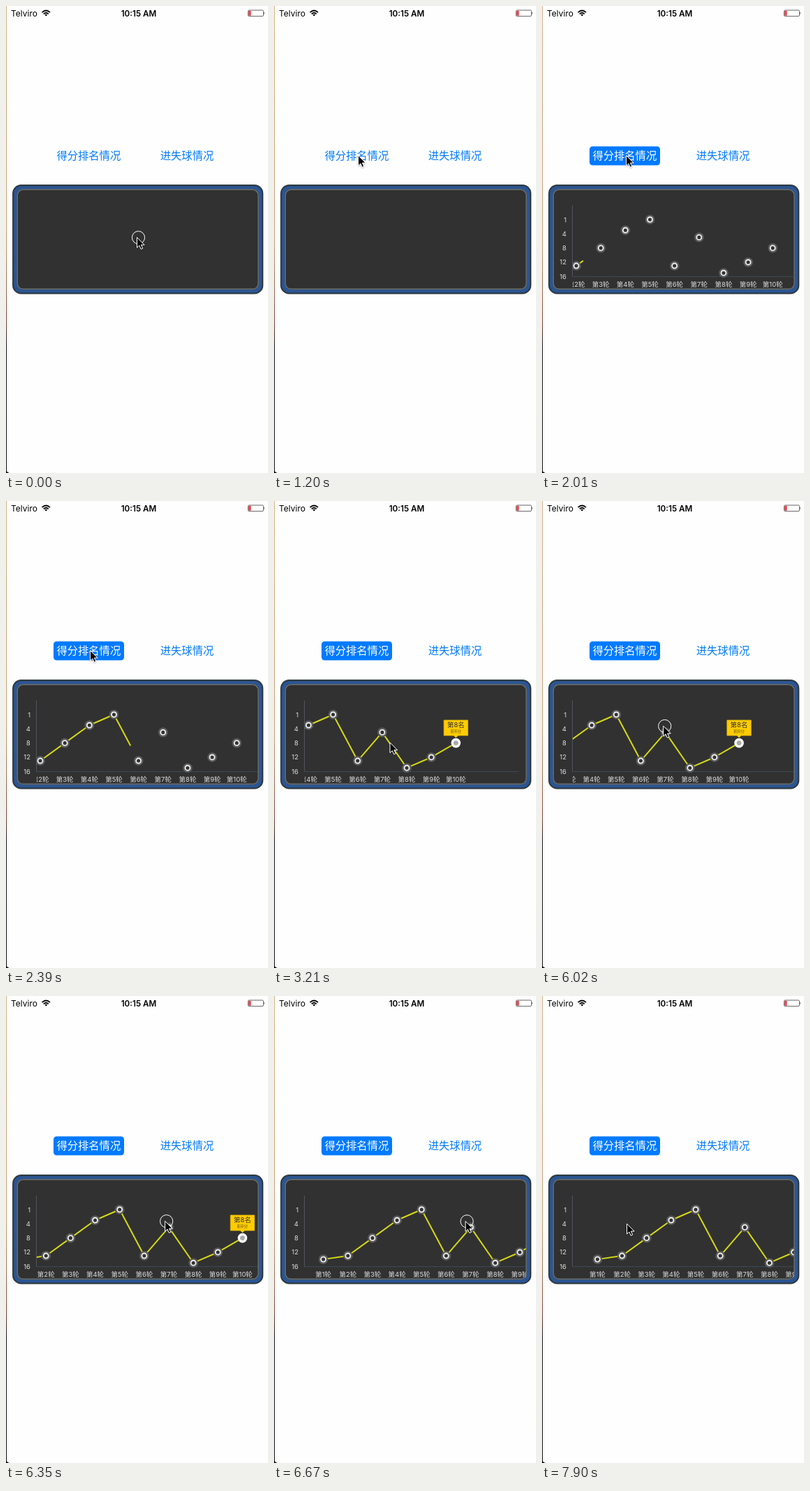
An HTML page for the animation above (8000 ms loop, 375x667 px).

```html
<!DOCTYPE html>
<html lang="zh">
<head>
<meta charset="utf-8">
<style>
html, body { margin: 0; width: 100%; height: 100%; overflow: hidden; background: #fefefe; }
svg { display: block; font-family: Inter, "Noto Sans CJK SC", "Noto Sans CJK", sans-serif; }
.btn { font-size: 15.3px; fill: #007aff; }
.axis { font-size: 9.5px; fill: #dcdcdc; }
.mid { text-anchor: middle; }
</style>
</head>
<body>
<svg width="375" height="667" viewBox="0 0 375 667">
  <defs>
    <linearGradient id="edge" x2="0" y2="1">
      <stop offset="0" stop-color="#d3b083"/>
      <stop offset=".5" stop-color="#c59a6a"/>
      <stop offset=".68" stop-color="#7d4030"/>
      <stop offset=".73" stop-color="#14121a"/>
      <stop offset="1" stop-color="#0c0c10"/>
    </linearGradient>
    <clipPath id="view"><rect x="44" y="282" width="316.5" height="121"/></clipPath>
    <filter id="shadow" x="-50%" y="-50%" width="200%" height="200%">
      <feDropShadow dx="0" dy="1" stdDeviation=".8" flood-opacity=".35"/>
    </filter>
  </defs>

  <rect width="1" height="667" fill="url(#edge)"/>
  <path d="M0 662Q1 666 5 667H0Z" fill="#111"/>

  <!-- status bar -->
  <text x="7" y="14.5" font-size="12">Telviro</text>
  <g fill="none" stroke="#000" stroke-width="1.8">
    <path d="M51.6 9.2Q57.3 3.8 63 9.2M53.8 11.4Q57.3 8.2 60.8 11.4"/>
    <path d="M55.3 12.6Q57.3 10.9 59.3 12.6L57.3 14.6Z" fill="#000" stroke="none"/>
  </g>
  <text class="mid" x="190" y="14.5" font-size="11.7" font-weight="600">10:15 AM</text>
  <rect x="346.5" y="6" width="22" height="8.6" rx="1.6" fill="none" stroke="#555" stroke-width=".9"/>
  <rect x="347.3" y="6.9" width="3.2" height="6.8" fill="#f5333f"/>
  <path d="M369.3 8.6Q371 10.3 369.3 12Z" fill="#333"/>

  <rect id="selected" x="68" y="200.5" width="101" height="27" rx="4.5" fill="#007aff"/>
  <text id="rankBtn" class="btn mid" x="118.3" y="219.3">得分排名情况</text>
  <text class="btn mid" x="259" y="219.3">进失球情况</text>

  <!-- panel -->
  <rect x="10.2" y="256.2" width="357" height="154.2" rx="11.5" fill="#2a5596" stroke="#2f3b42" stroke-width="2.2"/>
  <rect x="15.8" y="261.8" width="345.8" height="143" rx="8.4" fill="#313131" stroke="#3c5577" stroke-width="2"/>
  <rect x="16.4" y="262.4" width="344.6" height="141.8" rx="8" fill="none" stroke="#6f7064" stroke-width="1.2"/>

  <g id="chart">
    <path d="M43.5 285V386.5" stroke="#50555b"/>
    <g id="scale" class="axis" text-anchor="end"></g>
    <g clip-path="url(#view)">
      <g id="content">
        <path d="M-100 386.5H485.5" stroke="#3d4859"/>
        <path id="line" fill="none" stroke="#d5d911" stroke-width="2" stroke-linejoin="round" pathLength="100"/>
        <g id="dots"></g>
        <g id="tip" class="mid">
          <circle r="6.8" cy="345.6" fill="#fff"/>
          <circle r="3.4" cy="345.6" fill="#aaa"/>
          <path d="M-17.2 313H17.2V335H3L0 338L-3 335H-17.2Z" fill="#fc0" stroke="#e3b505" stroke-width=".8" stroke-linejoin="round"/>
          <text y="322.8" font-size="9.5" fill="#333">第8名</text>
          <text y="330.8" font-size="6" fill="#6b5a10">积6分</text>
        </g>
      </g>
    </g>
  </g>

  <g id="cursor">
    <circle id="touch" cx="2" cy=".2" r="9.1" fill="none" stroke="#fff"/>
    <path d="M0 0V14.6L3.4 11.6L5.7 16.8L8.2 15.7L5.9 10.7H10.6Z" fill="#050505" stroke="#fff" stroke-linejoin="round" filter="url(#shadow)"/>
  </g>
</svg>
<script>
const LOOP = 8000, STEP = 35.15, FIRST = 79.4;
const PRESS = 1700, OPEN = 1900, DRAWN = 2910, DRAG = 5890, DROP = 6920;
const SCROLL_START = 65.5, SCROLL_END = 135.4;
const ranks = [14, 13, 8, 3, 0, 13, 5, 15, 12, 8];

const $ = id => document.getElementById(id);
const px = i => FIRST + STEP * i;
const py = rank => 305 + 5.08 * rank;
const clamp = (v, lo, hi) => Math.min(hi, Math.max(lo, v));
const show = (id, on) => $(id).style.display = on ? '' : 'none';
const shift = (id, x, y) => $(id).setAttribute('transform', `translate(${x} ${y})`);

const linear = p => p;
const smooth = p => p * p * (3 - 2 * p);
const slow = p => 1 - (1 - p) ** 1.2;

// Each move takes the pointer on to x, y; sag bends it downwards
const home = { x: 187.5, y: 330.5 };
const moves = [
  { from: 510, to: 1200, x: 120.5, y: 213.4, ease: smooth },
  { from: 2430, to: 2680, x: 166, y: 345, ease: smooth },
  { from: 3210, to: 3610, x: 133.5, y: 319.5, ease: smooth },
  { from: DRAG, to: 6020, x: 173.5, y: 321.3, ease: linear },
  { from: 6020, to: DROP, x: 301.5, y: 321.8, ease: slow },
  { from: 7360, to: 7900, x: 121.5, y: 325.3, ease: linear, sag: 14 }
];

function pointerAt(t) {
  let { x, y } = home;
  for (const m of moves) {
    const p = m.ease(clamp((t - m.from) / (m.to - m.from), 0, 1));
    x += (m.x - x) * p;
    y += (m.y - y) * p + (m.sag || 0) * Math.sin(Math.PI * p);
  }
  return { x, y };
}

function scrollAt(t, x) {
  if (t < DRAWN) return SCROLL_START;
  if (t < DRAG) return SCROLL_END;
  return t > DROP ? 0 : clamp(113.9 - 1.045 * (x - 173.5), 0, SCROLL_END);
}

function draw(now) {
  const t = now % LOOP, { x, y } = pointerAt(t), open = t >= OPEN;
  shift('cursor', x, y);
  shift('content', -scrollAt(t, x), 0);
  show('touch', t < 30 || t >= 5330 && t < 7120);
  show('selected', open);
  show('chart', open);
  show('tip', t >= DRAWN);
  $('rankBtn').style.fill = open ? '#fff' : '';
  $('rankBtn').style.opacity = !open && t >= PRESS ? .2 : 1;
  const drawn = clamp((t - OPEN) / 10, 0, 100);
  $('line').setAttribute('stroke-dasharray', `${drawn} ${drawn < 100 ? 200 : 0}`);
  requestAnimationFrame(draw);
}

$('scale').innerHTML = [1, 4, 8, 12, 16]
  .map((n, i) => `<text x="35" y="${py(i * 4) + 3.5}">${n}</text>`).join('');
$('line').setAttribute('d', 'M' + ranks.map((r, i) => px(i) + ' ' + py(r)).join('L'));
$('dots').innerHTML = ranks.map((r, i) => `
  <g transform="translate(${px(i)} ${py(r)})">
    <circle r="6.8" fill="#5c5c5c"/>
    <circle r="3.5" fill="#333" stroke="#ececec" stroke-width="1.9"/>
  </g>
  <text class="axis mid" x="${px(i)}" y="400.6">第${i + 1}轮</text>`).join('');
shift('tip', px(9), 0);
requestAnimationFrame(draw);
</script>
</body>
</html>
```
